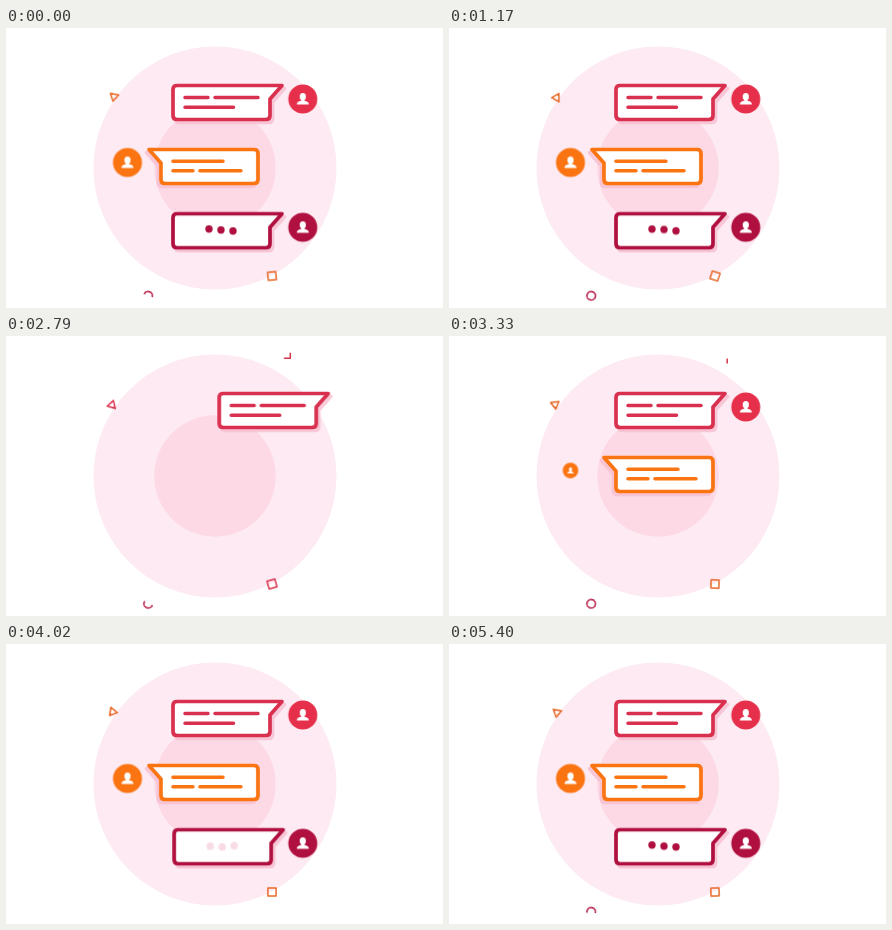
Recreate the animation shown at these times as an HTML page. Size 437x280 px, loop 5430 ms.

```html
<!DOCTYPE html>
<html lang="en">
<head>
<meta charset="utf-8">
<title>Chat bubbles</title>
<style>
  html, body { margin: 0; width: 100%; height: 100%; overflow: hidden; background: #fff; }
  svg { display: block; width: 100vw; height: 100vh; }
  :root { --loop: 5430ms; --sine: cubic-bezier(.37, 0, .63, 1); }

  .red { color: #d9304f; --face: #e6304b; --lag: 0ms; }
  .orange { color: #fb7412; --face: #fb7412; --lag: -5040ms; }
  .dark { color: #b01040; --face: #b01040; --lag: -4650ms; }

  .line { fill: none; stroke: currentColor; stroke-width: 3.5; stroke-linecap: round; }
  .box { fill: #fff; stroke: currentColor; stroke-width: 3.7; stroke-linejoin: round; }
  .shade { fill: #f7bfd0; stroke: #f7bfd0; stroke-width: 3.7; stroke-linejoin: round; opacity: .8; }

  /* Outer groups leave together; inner groups enter one after another. */
  .leave { animation: leave var(--loop) linear infinite; }
  .enter { animation: slide var(--loop) var(--sine) var(--lag) infinite,
                      show var(--loop) linear var(--lag) infinite; }
  .shrink { animation: shrink var(--loop) var(--sine) infinite; }
  .dark .shrink { animation-name: shrink-early; }
  .grow { animation: grow var(--loop) var(--sine) var(--lag) infinite; }

  @keyframes leave {
    0%, 31.5% { opacity: 1; }
    34.8%, 49.6% { opacity: 0; }
    49.7%, 100% { opacity: 1; }
  }
  @keyframes show {
    0%, 34.95% { opacity: 1; }
    35%, 49.72% { opacity: 0; }
    50.83%, 100% { opacity: 1; }
  }
  @keyframes slide {
    0%, 34.95% { transform: translateX(0); }
    35%, 50.28% { transform: translateX(60px); }
    54.14% { transform: translateX(-12px); }
    57.46% { transform: translateX(3px); }
    61.33%, 100% { transform: translateX(0); }
  }
  @keyframes shrink {
    0%, 34.44% { transform: scale(1); }
    37.75%, 52.25% { transform: scale(0); }
    52.3%, 100% { transform: scale(1); }
  }
  @keyframes shrink-early {
    0%, 31.5% { transform: scale(1); }
    34.8%, 52.25% { transform: scale(0); }
    52.3%, 100% { transform: scale(1); }
  }
  @keyframes grow {
    0%, 37.8% { transform: scale(1); }
    37.85%, 52.49% { transform: scale(0); }
    55.8% { transform: scale(1.06); }
    58%, 100% { transform: scale(1); }
  }

  .dot { animation: ink var(--loop) linear var(--ink, 0ms) infinite,
                    bob 543ms var(--sine) var(--bob, 0ms) infinite alternate; }
  .dot:nth-child(2) { --ink: -5310ms; --bob: -814ms; }
  .dot:nth-child(3) { --ink: -5190ms; --bob: -543ms; }
  @keyframes ink {
    0%, 38% { fill: #b01040; }
    38.1%, 75.14% { fill: #f9dbe6; }
    78.45%, 100% { fill: #b01040; }
  }
  @keyframes bob {
    from { transform: translateY(-1px); }
    to { transform: translateY(1px); }
  }

  .bit { fill: none; stroke: #e8692a; stroke-width: 1.5; stroke-linejoin: round; }
  .triangle { animation: turn var(--loop) linear infinite, tint var(--loop) step-end infinite; }
  .square { animation: turn-back var(--loop) linear infinite, tint var(--loop) step-end infinite; }
  .ring { stroke: #b3123f; stroke-dasharray: 100 110; animation: ring 1810ms var(--sine) -1560ms infinite; }
  .zigzag { stroke: #cf3548; animation: zigzag var(--loop) linear infinite; }

  @keyframes turn {
    from { transform: rotate(-18deg); }
    to { transform: rotate(342deg); }
  }
  @keyframes turn-back {
    from { transform: rotate(-6deg); }
    to { transform: rotate(-726deg); }
  }
  @keyframes tint {
    0% { stroke: #e8692a; }
    38.7% { stroke: #d9344f; }
    56.4%, 100% { stroke: #e8692a; }
  }
  @keyframes ring {
    0%, 27.6% { stroke-dashoffset: 101; }
    51.4%, 72.4% { stroke-dashoffset: 0; }
    100% { stroke-dashoffset: -101; }
  }
  /* Dash values: empty, tail gap, visible part, rest. */
  @keyframes zigzag {
    0%, 23.94% { stroke-dasharray: 0 0 0 99; }
    47.15% { stroke-dasharray: 0 0 14.2 99; }
    59.85% { stroke-dasharray: 0 15.2 6.8 99; }
    65.56%, 100% { stroke-dasharray: 0 22 0 99; }
  }
</style>
</head>
<body>
<svg viewBox="0 0 437 280">
  <defs>
    <path id="outline" d="M171 57.5H276L264 71V87.5Q264 91.5 260 91.5H171Q167 91.5 167 87.5V61.5Q167 57.5 171 57.5Z"/>
    <g id="bubble">
      <use href="#outline" class="shade" x="2.5" y="3"/>
      <use href="#outline" class="box"/>
    </g>
    <g id="avatar">
      <circle r="14.5" style="fill: var(--face)"/>
      <g fill="#fff">
        <ellipse cy="-2.3" rx="3.1" ry="3.6"/>
        <path d="M-1.7 0H1.7V1.8Q6 2.3 6 5.6H-6Q-6 2.3 -1.7 1.8Z"/>
      </g>
    </g>
  </defs>

  <circle cx="209" cy="140" r="121.5" fill="#fdeaf2"/>
  <circle cx="209" cy="140" r="60.7" fill="#fdd9e5"/>

  <g transform="translate(107 68.8)">
    <path class="bit triangle" d="M5.8 0L-1.4 4.16V-4.16Z"/>
  </g>
  <g transform="translate(266 248)">
    <rect class="bit square" x="-4.1" y="-4.1" width="8.2" height="8.2"/>
  </g>
  <g transform="translate(142.2 267.8) rotate(18)">
    <circle class="bit ring" r="4.3" pathLength="100"/>
  </g>
  <path class="bit zigzag" d="M289 16.5H284.3V22.3H278.2V27.5" pathLength="22"/>

  <g class="red">
    <g class="leave"><g class="enter">
      <use href="#bubble"/>
      <path class="line" d="M179 69.6H202M209 69.6H252M179 79.2H227.5"/>
    </g></g>
    <g transform="translate(296.8 71)"><g class="shrink"><g class="grow"><use href="#avatar"/></g></g></g>
  </g>

  <g class="orange">
    <g transform="translate(419 64) scale(-1 1)"><g class="leave"><g class="enter">
      <use href="#bubble"/>
      <path class="line" d="M252 69.2H202M252 78.7H232M225 78.7H184"/>
    </g></g></g>
    <g transform="translate(121.5 134.5)"><g class="shrink"><g class="grow"><use href="#avatar"/></g></g></g>
  </g>

  <g class="dark">
    <g transform="translate(0 128.2)"><g class="leave"><g class="enter">
      <use href="#bubble"/>
      <g>
        <circle class="dot" cx="203" cy="73.8" r="3.7"/>
        <circle class="dot" cx="215" cy="73.8" r="3.7"/>
        <circle class="dot" cx="227" cy="73.8" r="3.7"/>
      </g>
    </g></g></g>
    <g transform="translate(296.8 199.3)"><g class="shrink"><g class="grow"><use href="#avatar"/></g></g></g>
  </g>
</svg>
</body>
</html>
```
